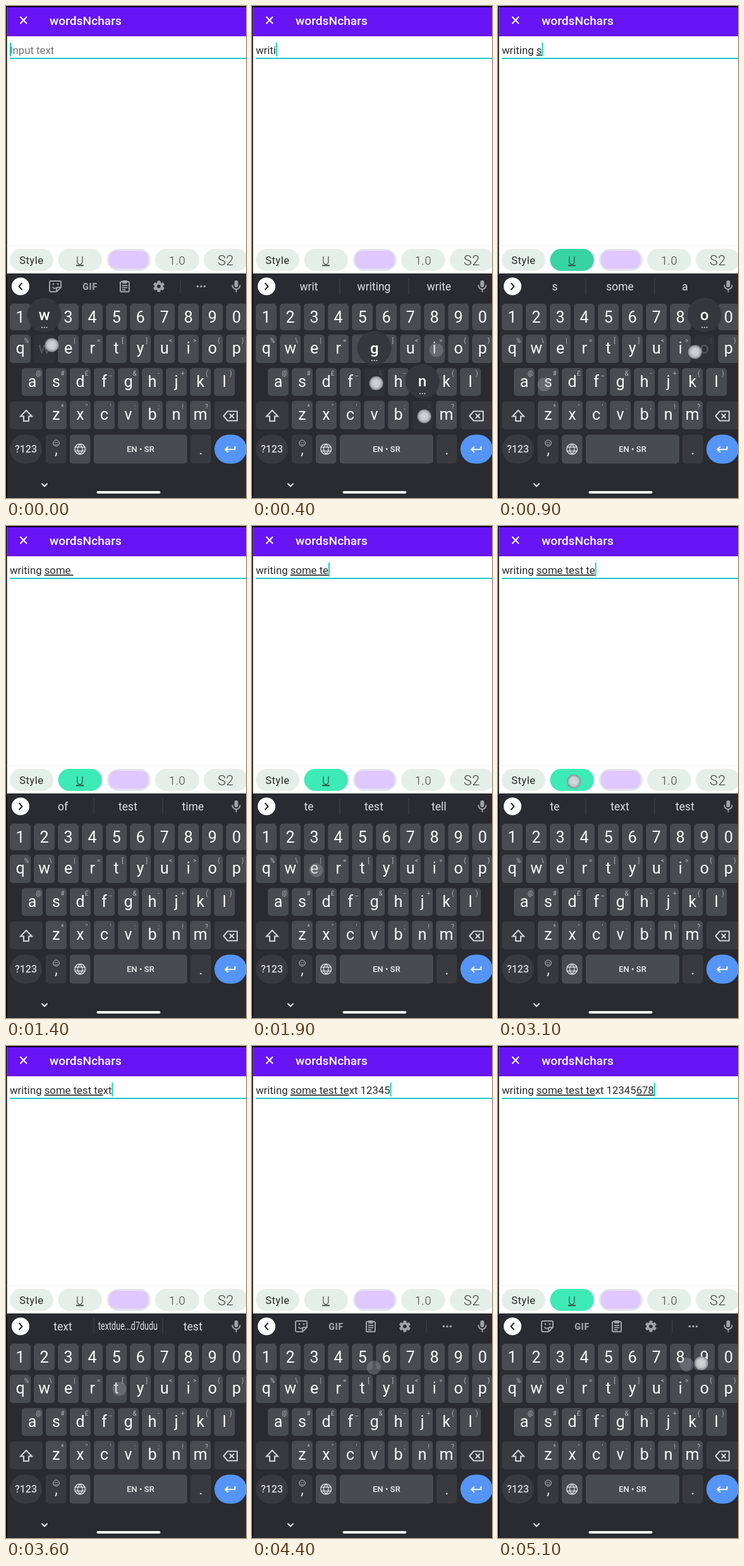
Write an HTML page that moves like this. It is 380x780 px and loops after 5200 ms.

```html
<!DOCTYPE html>
<html lang="en">
<head>
<meta charset="utf-8">
<title>Text editor demo</title>
<style>
html, body { margin: 0; width: 100%; height: 100%; overflow: hidden; background: #000; }
svg { display: block; font-family: Roboto, Arial, sans-serif; }
text { white-space: pre; }
.mid { text-anchor: middle; }
.cap { font-size: 25px; fill: #fbfbfc; }
.hint { font-size: 10px; fill: #b3b5b9; }
.line { fill: none; stroke-width: 2; stroke-linecap: round; stroke-linejoin: round; }
.u { text-decoration: underline; text-decoration-skip-ink: none; text-decoration-thickness: 1px; }
</style>
</head>
<body>
<svg id="stage" width="380" height="780" viewBox="0 0 380 780">
  <defs>
    <radialGradient id="dot">
      <stop offset="0" stop-color="#dfe1e4"/>
      <stop offset=".65" stop-color="#cbcdd1"/>
      <stop offset="1" stop-color="#85888e"/>
    </radialGradient>
  </defs>
</svg>
<script>
const LOOP = 5200, STEP = 100;
const stage = document.getElementById('stage');
const KEY = '#484b50', DARK = '#383a40', BOARD = '#292b31', ICON = '#9fa1a6', TEAL = '#18cdbf', CHIP = '#e5efe9';

const rect = (x, y, w, h, fill, r = 0, more = '') =>
  `<rect x="${x}" y="${y}" width="${w}" height="${h}" rx="${r}" fill="${fill}" ${more}/>`;
const disc = (x, y, r, fill, more = '') => `<circle cx="${x}" cy="${y}" r="${r}" fill="${fill}" ${more}/>`;
const line = (d, color, more = '') => `<path class="line" d="${d}" stroke="${color}" ${more}/>`;
const esc = s => s.replace(/&/g, '&amp;').replace(/</g, '&lt;');
const label = (s, x, y, size, fill, more = '') =>
  `<text class="mid" x="${x}" y="${y}" font-size="${size}" fill="${fill}" ${more}>${esc(s)}</text>`;

// Press times: [ms, key, touch offset x, y]
const presses = [
  [0, 'w', 12, -6], [100, 'r'], [150, 'i'], [200, 't'], [300, 'i'], [350, 'n'], [400, 'g'], [500, ' '],
  [600, 'U'], [800, 's', -6, 4], [900, 'o', -15, 5], [1000, 'm'], [1100, 'e'], [1200, ' '],
  [1600, 't'], [1800, 'e'], [2000, 's'], [2100, 't'], [2700, ' '], [2800, 't'], [2900, 'e'],
  [3100, 'U'], [3300, 'x'], [3500, 't', 5, 0], [3700, ' '],
  [3900, '1'], [4000, '2'], [4100, '3'], [4200, '4'], [4300, '5', 18, 17],
  [4500, 'U'], [4700, '6'], [4900, '7'], [5000, '8', 10, 12], [5100, '9', -5, 10]
];

// Suggestions from a given text length on; no words means the tool icons
const words = [
  [0, ''], [1, 'w we what'], [2, 'wr write writing'], [4, 'writ writing write'], [7, 'writing writings write'],
  [8, 'a to the'], [9, 's some a'], [10, 'so some do'], [12, 'some done come'], [13, 'of test time'],
  [14, 't the to'], [15, 'te test tell'], [16, 'test rest tests'], [18, 'to and the'], [19, 't the to'],
  [20, 'te text test'], [21, 'tex text test'], [22, 'text textdue...d7dudu test'], [23, 'me and to'], [24, '']
];

const keys = { ' ': { x: 213, y: 689 }, U: { x: 117, y: 403 } };
const rows = [
  { s: '1234567890', x: 22.5, y: 493, h: 42 },
  { s: 'qwertyuiop', x: 22.5, y: 543.5, h: 45, hints: '%\\|=[]<>{}' },
  { s: 'asdfghjkl', x: 41.5, y: 596, h: 44, hints: '@#£_&-+()' },
  { s: 'zxcvbnm', x: 79.5, y: 648.5, h: 45, hints: '*"\':;!?' }
];

function letterKeys() {
  let out = '';
  for (const { s, x, y, h, hints } of rows) {
    [...s].forEach((c, i) => {
      const cx = x + i * 38.05;
      keys[c] = { x: cx, y, popup: !!hints };
      out += `<g id="key-${c}">` + rect(cx - 16.5, y - h / 2, 33, h, KEY, 5)
        + `<text class="mid cap" x="${cx}" y="${hints ? y + 7.5 : y + 9}">${c}</text>`
        + (hints ? `<text class="mid hint" x="${cx + 10}" y="${y - 10}">${esc(hints[i])}</text>` : '') + '</g>';
    });
  }
  return out;
}

const mic = rect(361.5, 435, 6, 11, ICON, 3) + line('M358.5 443a6 6 0 0 0 12 0M364.5 449v4', ICON);

function toolIcons() {
  let teeth = '';
  for (let a = 0; a < 360; a += 60) teeth += rect(239.5, 435.5, 5, 5, ICON, 1, `transform="rotate(${a} 242 444.5)"`);
  return line('M80 453H71q-2 0-2-2V438q0-2 2-2H85q2 0 2 2V446L80 453V448q0-2 2-2H87', ICON)
    + disc(75, 441, 1.4, ICON) + disc(82, 441, 1.4, ICON) + line('M74 446q2 3 5 1', ICON)
    + label('GIF', 133, 449.5, 14, ICON, 'font-weight="900" letter-spacing=".7"')
    + rect(181, 437, 14, 16, 'none', 1.5, `stroke="${ICON}" stroke-width="2"`) + rect(184, 435, 8, 5, ICON, 1)
    + line('M184.5 443h7M184.5 446.5h7M184.5 450h4', ICON, 'stroke-width="1.5"')
    + teeth + disc(242, 444.5, 4.8, 'none', `stroke="${ICON}" stroke-width="4"`)
    + rect(275.5, 434, 1, 21, '#45474c')
    + [303.5, 309, 314.5].map(x => disc(x, 444.5, 1.8, ICON)).join('');
}

function strip(n) {
  const list = words.filter(w => w[0] <= n).pop()[1];
  const chevron = list ? 'M21 439.5l4.5 5-4.5 5' : 'M25 439.5l-4.5 5 4.5 5';
  const head = disc(23, 444.5, 14, '#fff') + line(chevron, '#25272c');
  if (!list) return head + toolIcons();
  return head + rect(138.5, 432, 1, 26, '#45474c') + rect(247.5, 432, 1, 26, '#45474c')
    + list.split(' ').map((w, i) => {
      const x = 90 + i * 103;
      // long words are condensed, as the keyboard does
      const squeeze = w.length > 12 ? `transform="translate(${x * .28}) scale(.72 1)"` : '';
      return label(w, x, 450.5, 17.5, '#dfe0e3', squeeze);
    }).join('');
}

function staticParts() {
  return rect(1.5, 2, 379, 424, '#fff') + rect(1.5, 2, 379, 46, '#6714f6')
    + line('M22.5 17l10.5 11M33 17l-10.5 11', '#fff', 'style="stroke-linecap:butt"')
    + '<text x="69" y="30" font-size="19.2" font-weight="500" fill="#fff">wordsNchars</text>'
    + rect(6, 82, 374, 2, TEAL)
    + rect(1.5, 379.5, 379, 1, '#f0f0f0')
    + rect(6, 385, 69, 35, CHIP, 17.5) + rect(160, 385, 69, 35, '#e6e5ed', 17.5) + rect(163, 388, 62.5, 28.5, '#dfc8ff', 12)
    + rect(236, 385, 70, 35, CHIP, 17.5) + rect(313, 385, 70, 35, CHIP, 17.5)
    + label('Style', 40.3, 409, 16.5, '#252827', 'letter-spacing=".5"')
    + label('1.0', 271, 410, 18.5, '#3d4240', 'font-weight="300" letter-spacing=".4"')
    + label('S2', 348, 411, 21.5, '#3d4240', 'font-weight="300" letter-spacing=".4"')
    + rect(1.5, 424, 379, 356, BOARD) + mic + letterKeys()
    + rect(6, 627, 52, 44, DARK, 5) + line('M32 641l-9 9.5h5V658h8v-7.5h5z', '#d4d5d8', 'style="stroke-linejoin:miter"')
    + rect(330, 627, 52, 44, DARK, 5) + line('M351 642.5h15v15h-15l-6.5-7.5zM354.5 647l6 6M360.5 647l-6 6', '#d4d5d8')
    + rect(6, 679.5, 51, 46, DARK, 23) + label('?123', 31.5, 708, 16, '#d5d6d9', 'font-weight="500"')
    + rect(63, 679.5, 32.5, 46, DARK, 5) + label(',', 79.5, 711, 23, '#f4f4f5')
    + disc(79.5, 693, 4.8, 'none', 'stroke="#c5c6ca"') + disc(77.8, 691.7, .8, '#c5c6ca') + disc(81.2, 691.7, .8, '#c5c6ca')
    + line('M77 694.3q2.5 3 5 0', '#c5c6ca', 'style="stroke-width:1"')
    + rect(101, 679.5, 32.5, 46, KEY, 5) + disc(117.2, 702.5, 8.3, 'none', 'stroke="#d4d5d8" stroke-width="1.6"')
    + line('M109.5 699.5h15.4M109.5 705.5h15.4M117.2 694.5c-5 5-5 11 0 16c5-5 5-11 0-16', '#d4d5d8', 'style="stroke-width:1.5"')
    + rect(139, 679.5, 148, 46, KEY, 5) + label('EN • SR', 213, 707, 13, '#f0f0f2', 'font-weight="500"')
    + rect(292, 679.5, 32.5, 46, DARK, 5) + label('.', 308.3, 711, 24, '#f4f4f5')
    + rect(330, 679.5, 51, 46, '#5594f8', 23)
    + line('M362.5 698v5h-14.5M352 698.5l-4.7 4.5 4.7 4.5', '#fff', 'style="stroke-linecap:butt;stroke-linejoin:miter"')
    + line('M57 757.5l4 4 4-4', '#f4f4f5') + rect(143.5, 769, 101, 4, '#fff', 2);
}

stage.insertAdjacentHTML('beforeend', staticParts()
  + rect(82.5, 385, 69.5, 35, CHIP, 17.5, 'id="chip"')
  + label('U', 117, 409.5, 18, '#333a37', 'class="mid u" font-weight="300"').replace('class="mid" ', '')
  + '<g id="strip"></g><text id="hint" x="6" y="76" font-size="16.75" fill="#747474">Input text</text>'
  + '<text id="typed" x="6" y="76" font-size="16.75" fill="#2b2b2b" xml:space="preserve"></text>'
  + rect(6, 58, 2, 22, TEAL, 0, 'id="caret"') + '<g id="touches"></g>');

const $ = id => document.getElementById(id);
const set = (id, name, value) => $(id).setAttribute(name, value);

function popup({ x, y }, c) {
  return disc(x, y - 54, 27, '#35373c') + label(c, x, y - 45.5, 24, '#fff', 'font-weight="500"')
    + [-3.7, 0, 3.7].map(d => disc(x + d, y - 34, 1, '#e4e5e7')).join('');
}

function draw(t) {
  let on = false, flip = -LOOP, n = 0, markup = '', touches = '', popups = '';
  for (const c in keys) if ($('key-' + c)) set('key-' + c, 'opacity', 1);

  for (const [time, c, dx = 3, dy = 2] of presses) {
    const age = t - time, key = keys[c];
    if (age < 0) break;
    if (age >= STEP) {
      if (c === 'U') { on = !on; flip = time; }
      else { n++; markup += `<tspan${on ? ' class="u"' : ''}>${c}</tspan>`; }
    }
    if (age >= 2 * STEP) continue;
    const x = key.x + dx, y = key.y + dy;
    if (age < STEP) {
      touches += disc(x, y, 11, 'url(#dot)', 'opacity=".94"');
      if (key.popup) {
        popups += popup(key, c);
        set('key-' + c, 'opacity', .22);
      }
    } else touches += disc(x, y, 11, '#a0a2a6', 'opacity=".36"');
  }

  $('typed').innerHTML = markup.replace(/<\/tspan><tspan( class="u")?>/g, (m, u) => m)
    .replace(/(<tspan class="u">[^<]*<\/tspan>)+|(<tspan>[^<]*<\/tspan>)+/g, run => {
      const chars = run.replace(/<[^>]+>/g, '');
      return run.includes('"u"') ? `<tspan class="u">${chars}</tspan>` : `<tspan>${chars}</tspan>`;
    });
  set('hint', 'opacity', n ? 0 : 1);
  const hidden = (t >= 1400 && t < 1600) || (t >= 2500 && t < 2700);
  set('caret', 'opacity', hidden ? 0 : 1);
  set('caret', 'x', 6 + (n ? $('typed').getComputedTextLength() : 0));
  const ripple = t - flip < 400;
  set('chip', 'fill', on ? (ripple ? '#38d3a2' : '#3eeab6') : (ripple ? '#d2dbd6' : CHIP));
  $('strip').innerHTML = strip(n);
  $('touches').innerHTML = popups + touches;
}

const start = performance.now();
let shown = 0;
function tick() {
  const t = Math.floor((performance.now() - start) % LOOP / STEP) * STEP;
  if (t !== shown) draw(shown = t);
  requestAnimationFrame(tick);
}
draw(0);
requestAnimationFrame(tick);
</script>
</body>
</html>
```
